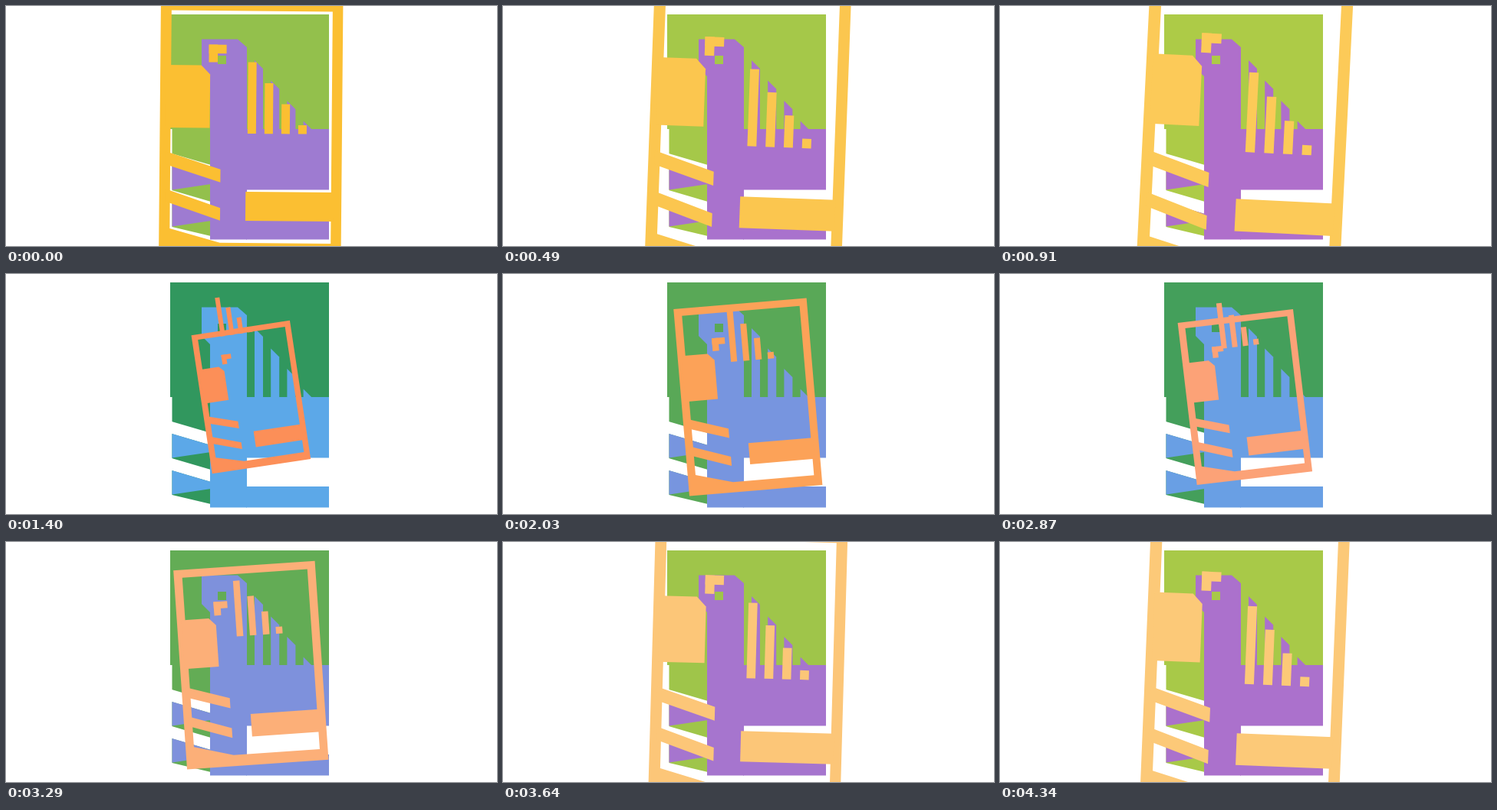
Write an HTML page with a canvas that moves like this. It is 640 px wide and 314 px high and loops after 4410 ms.

```html
<!DOCTYPE html>
<html lang="en">
<head>
<meta charset="utf-8">
<title>Dinosaur cut-out</title>
<style>
html, body { margin: 0; width: 100%; height: 100%; overflow: hidden; background: #fff; }
canvas { display: block; }
</style>
</head>
<body>
<canvas id="stage" width="640" height="314"></canvas>
<script>
const ctx = document.getElementById('stage').getContext('2d');
const LOOP = 4410, STEP = 70;

// Tilt of the cut-out: time (ms), degrees
const SWING = [
  [0, 0.5], [350, -7], [725, 22], [910, 2.85], [1500, -9], [2030, -4.85], [2410, 22],
  [2590, 6.7], [2870, -6.75], [3640, 1.6], [3960, 22], [4340, 2.35], [LOOP, 0.5]
];

const slope = i => (SWING[i + 1][1] - SWING[i][1]) / (SWING[i + 1][0] - SWING[i][0]);

// Tangent that never overshoots the key points
function tangent(i) {
  const a = slope(Math.max(0, i - 1)), b = slope(Math.min(SWING.length - 2, i));
  return a * b <= 0 ? 0 : 2 * a * b / (a + b);
}

function tiltAt(t) {
  const i = SWING.findIndex((key, n) => t < SWING[n + 1][0]);
  const [t0, a] = SWING[i], [t1, b] = SWING[i + 1];
  const u = (t - t0) / (t1 - t0), v = 1 - u;
  return v * v * (1 + 2 * u) * a + u * u * (3 - 2 * u) * b
    + (t1 - t0) * u * v * (v * tangent(i) - u * tangent(i + 1));
}

function ramp(t, from, to) {
  const u = Math.min(1, Math.max(0, (t - from) / (to - from)));
  return u * u * (3 - 2 * u);
}

const rgb = (...c) => `rgb(${c.map(v => Math.round(Math.min(255, Math.max(0, v))))})`;

function trace(...p) {
  ctx.moveTo(p[0], p[1]);
  for (let i = 2; i < p.length; i += 2) ctx.lineTo(p[i], p[i + 1]);
  ctx.closePath();
}

function poly(...p) {
  ctx.beginPath();
  trace(...p);
  ctx.fill();
}

// Slanted strip with upright ends
const band = (x, y, w, drop, h) => poly(x, y, x + w, y + drop, x + w, y + drop + h, x, y + h);

function drawScene(green, purple) {
  ctx.fillStyle = green;
  ctx.fillRect(214, 11, 207, 150);
  poly(216.5, 160, 267, 160, 267, 301, 216.5, 289);

  for (const y of [193, 241]) {
    ctx.fillStyle = '#fff';
    band(216, y, 51, 15, 16);
    ctx.fillStyle = purple;
    poly(216.5, y + 16, 267, y + 31, 267, y + 40, 216.5, y + 47.5);
  }

  poly(255, 43.5, 302, 43.5, 314, 54, 314, 305.5, 266, 305.5, 266, 92, 255, 81);
  ctx.fillRect(313, 161, 108, 79.5);
  ctx.fillRect(313, 278, 108, 27.5);
  for (let i = 0; i < 4; i++) {
    const x = 324 + 21.2 * i, y = 71 + 26.5 * i;
    poly(x, y, x + 11, y + 11, x + 11, 162, x, 162);
  }

  ctx.fillStyle = green;
  ctx.fillRect(276, 65, 11, 11);
}

function drawFrame() {
  ctx.beginPath();
  trace(200.5, -6.5, 438, -6.5, 438, 328.5, 200.5, 328.5);
  trace(214.5, 6.5, 424.5, 6.5, 424.5, 310, 280, 310, 214.5, 292);
  ctx.fill('evenodd');
  poly(208, 78, 254, 78, 265.5, 90, 265.5, 160, 208, 160);
  band(208, 191, 72, 23, 17);
  band(208, 240, 72, 24.5, 16.5);
  ctx.fillRect(313, 243, 115, 38);
  ctx.fillRect(263.7, 51, 23, 11.5);
  ctx.fillRect(263.7, 51, 11.5, 23);
}

function drawBars() {
  for (let i = 0; i < 4; i++) {
    const top = 72.5 + 27.3 * i;
    ctx.fillRect(316.3 + 22 * i, top, 11, 166 - top);
  }
}

// Draws a part scaled and turned about its own pivot
function turned(x, y, scale, angle, part) {
  ctx.save();
  ctx.translate(x, y);
  ctx.rotate(angle);
  ctx.scale(scale, scale);
  ctx.translate(-x, -y);
  part();
  ctx.restore();
}

function draw(t) {
  const tilt = tiltAt(t);
  const scale = 0.975 + 0.05 * tilt, angle = tilt * Math.PI / 180;

  ctx.fillStyle = '#fff';
  ctx.fillRect(0, 0, 640, 314);
  drawScene(
    rgb(142 + 10.9 * tilt, 190 + 4.6 * tilt, 77 - 2 * tilt),
    rgb(154 + 7.2 * tilt, 125 - 5 * tilt, 210 - 2.6 * tilt)
  );

  const fade = 7.5 * ramp(t, 0, 700) + 6.5 * ramp(t, 2600, 2900);
  ctx.fillStyle = `hsl(${41.3 + 1.9 * tilt - 0.65 * fade}, 96%, ${59 + fade}%)`;
  turned(319.5, 161, scale, angle, drawFrame);
  turned(208, 2, scale, angle, drawBars);
}

let start = null;
function tick(now) {
  if (start === null) start = now;
  draw(Math.floor((now - start) % LOOP / STEP) * STEP);
  requestAnimationFrame(tick);
}
draw(0);
requestAnimationFrame(tick);
</script>
</body>
</html>
```
